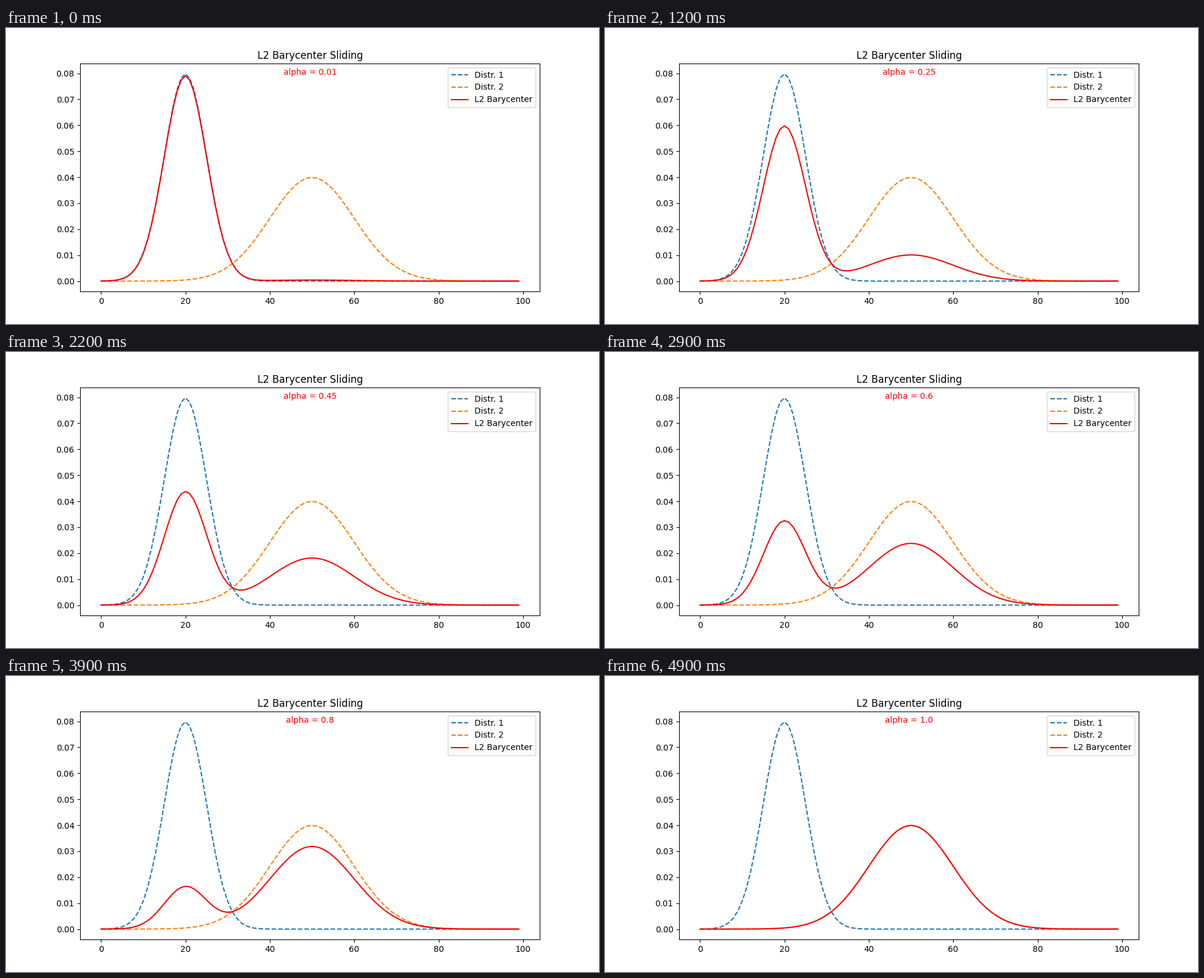
Animation of 1000x500 px, one loop 5000 ms. Source, as a matplotlib script:

```python
import numpy as np
import matplotlib.pyplot as plt
from matplotlib.animation import FuncAnimation

FRAMES = 50
INTERVAL = 100

x = np.arange(100)
alphas = np.linspace(0.01, 1, FRAMES)


def gauss(mean, std):
    h = np.exp(-((x - mean) ** 2) / (2 * std ** 2))
    return h / h.sum()


a1 = gauss(20, 5)
a2 = gauss(50, 10)

fig, ax = plt.subplots(figsize=(10, 5), dpi=100)
ax.plot(x, a1, "--", color="tab:blue", label="Distr. 1")
ax.plot(x, a2, "--", color="tab:orange", label="Distr. 2")
curve, = ax.plot(x, a1, color="red", label="L2 Barycenter")
label = ax.text(0.5, 0.95, "", color="red", ha="center", transform=ax.transAxes)
ax.set_title("L2 Barycenter Sliding")
ax.legend(loc="upper right")


def update(i):
    alpha = alphas[i]
    curve.set_ydata((1 - alpha) * a1 + alpha * a2)
    label.set_text(f"alpha = {round(float(alpha), 2)}")
    return curve, label


anim = FuncAnimation(fig, update, frames=FRAMES, interval=INTERVAL,
                     repeat=True, repeat_delay=0)
plt.show()
```
